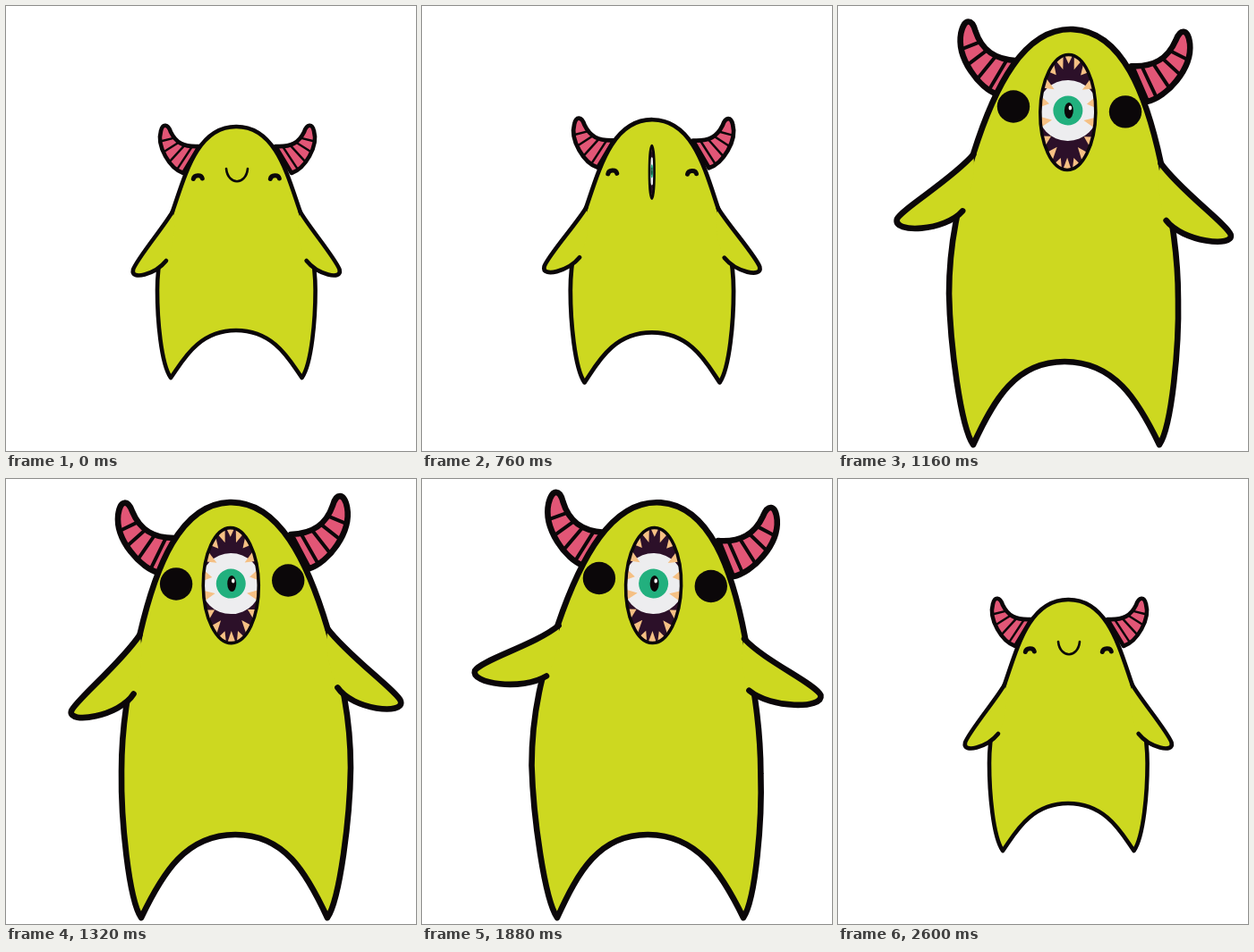
Write an HTML page with a canvas that moves like this. It is 458 px wide and 498 px high and loops after 2.64 s.

```html
<!DOCTYPE html>
<html>
<head>
<meta charset="utf-8">
<style>
html, body { margin: 0; width: 458px; height: 498px; overflow: hidden; background: #fff; }
canvas { display: block; }
</style>
</head>
<body>
<canvas id="stage" width="458" height="498"></canvas>
<script>
const ctx = document.getElementById('stage').getContext('2d');
const LOOP = 2640, INK = '#0b0709', SKIN = '#cdd820', HORN = '#e25676', TOOTH = '#f5c084';

// Left half of each part, as x,y pairs of Bezier points; the right half is mirrored.
const BODY = {
  calm: [257,135, 213,135, 200,190, 186,230, 176,260, 169,285, 169,318,
         169,350, 173,400, 184,416, 196,400, 213,363, 257,363],
  wild: [255,26, 200,26, 170,95, 150,171, 140,215, 127,260, 127,325,
         127,380, 137,470, 151,491, 175,440, 200,398, 255,398]
};
const ARM = {
  calm: [186,230, 178,245, 146,283, 142,295, 139,308, 167,300, 179,285],
  down: [150,171, 128,202, 75,243, 71,254, 66,270, 125,262, 141,237],
  up:   [152,172, 125,187, 60,187, 51,201, 48,215, 105,232, 142,220]
};
const HORNS = {
  calm: [198,187, 183,182, 168,157, 173,140, 175,131, 181,132, 184,141, 190,153, 198,158, 216,157],
  wild: [175,103, 153,97, 126,64, 130,36, 133,18, 142,20, 146,33, 154,54, 169,64, 194,64]
};
const BEATS = [960, 1320, 1640, 2120];

const mix = (a, b, k) => a + (b - a) * k;
const mixAll = (a, b, k) => a.map((v, i) => mix(v, b[i], k));
const smooth = (t, from, to) => {
  const k = Math.min(1, Math.max(0, (t - from) / (to - from)));
  return k * k * (3 - 2 * k);
};

// Half turns done at time t, given the count reached on each beat.
function swing(t, counts) {
  const i = t < BEATS[1] ? 0 : t < BEATS[2] ? 1 : 2;
  const k = (t - BEATS[i]) / (BEATS[i + 1] - BEATS[i]);
  return Math.cos(Math.PI * mix(counts[i], counts[i + 1], k));
}

let tilt = 0;

// The upper body turns around the chest while the feet stay put.
function bend([x, y]) {
  const w = y < 250 ? 1 : Math.max(0, 1 - (y - 250) / 240) ** 2;
  const c = Math.cos(tilt * w), s = Math.sin(tilt * w), dx = x - 256, dy = y - 190;
  return [256 + dx * c - dy * s, 190 + dx * s + dy * c];
}

function points(list, axis) {
  const out = [];
  for (let i = 0; i < list.length; i += 2) {
    out.push([axis === undefined ? list[i] : 2 * axis - list[i], list[i + 1]]);
  }
  return out;
}

function curve(pts) {
  ctx.beginPath();
  ctx.moveTo(...pts[0]);
  for (let i = 1; i < pts.length; i += 3) {
    ctx.bezierCurveTo(...pts[i], ...pts[i + 1], ...pts[i + 2]);
  }
}

function bezierAt(p, t) {
  const u = 1 - t, w = [u * u * u, 3 * u * u * t, 3 * u * t * t, t * t * t];
  return [0, 1].map(d => w.reduce((sum, k, i) => sum + k * p[i][d], 0));
}

function paint(fill, width) {
  ctx.fillStyle = fill;
  ctx.fill();
  ctx.lineWidth = width;
  ctx.stroke();
}

function oval(x, y, rx, ry, fill) {
  ctx.beginPath();
  ctx.ellipse(x, y, rx, ry, 0, 0, 2 * Math.PI);
  ctx.fillStyle = fill;
  ctx.fill();
}

function drawHorn(pts, grow, width) {
  pts = pts.map(bend);
  curve(pts);
  ctx.closePath();
  paint(HORN, width);
  ctx.lineWidth = mix(2.4, 4, grow);
  ctx.beginPath();
  for (let k = 0.21; k < 0.9; k += 0.21) {
    ctx.moveTo(...bezierAt(pts.slice(0, 4), 1 - k));
    ctx.lineTo(...bezierAt(pts.slice(6, 10), k));
  }
  ctx.stroke();
}

function drawArm(pts, side, width) {
  const [top, inner] = [pts[0], pts[6]];
  const bulge = bend([(top[0] + inner[0]) / 2 + 10 * side, (top[1] + inner[1]) / 2]);
  pts = pts.map(bend);
  curve(pts);
  ctx.quadraticCurveTo(...bulge, ...pts[0]);
  ctx.fillStyle = SKIN;
  ctx.fill();
  curve(pts);
  ctx.lineWidth = width;
  ctx.stroke();
}

function drawEye(x, y, grow) {
  [x, y] = bend([x, y]);
  if (grow > 0.1) {
    const r = mix(6, 18.2, grow);
    oval(x, y, r, r, INK);
    return;
  }
  ctx.beginPath();
  ctx.moveTo(x - 5, y + 1.5);
  ctx.bezierCurveTo(x - 4, y - 3.5, x + 4, y - 3.5, x + 5, y + 1);
  ctx.lineWidth = 5;
  ctx.stroke();
}

function drawMouth(grow) {
  if (grow < 0.02) {
    curve([[246, 182], [248, 201], [268, 201], [270, 182]]);
    ctx.lineWidth = 2.6;
    ctx.stroke();
    return;
  }
  const rx = mix(0.6, 31, grow), ry = mix(27, 64.5, grow);
  ctx.save();
  ctx.translate(...bend([mix(257, 253.5, grow), mix(191, 119, grow)]));
  ctx.rotate(tilt * 0.3);
  ctx.save();
  ctx.scale(rx / 31, ry / 64.5);
  oval(0, 0, 31, 64.5, '#2c1029');
  ctx.clip();
  oval(0, -2, 34, 34, '#ededef');
  ctx.fillStyle = TOOTH;
  for (let i = 0; i < 18; i++) {
    const a = (i + 0.5) * Math.PI / 9, size = 1 - 0.25 * (i % 2);
    const x = 31 * Math.cos(a), y = 64.5 * Math.sin(a);
    const nx = -Math.cos(a), ny = -Math.sin(a) * 0.8;
    ctx.beginPath();
    ctx.moveTo(x - 6 * ny, y + 6 * nx);
    ctx.lineTo(x + 13 * nx * size, y + 17 * ny * size);
    ctx.lineTo(x + 6 * ny, y - 6 * nx);
    ctx.fill();
  }
  oval(0, -2, 16.5, 16.5, '#22b07e');
  oval(1, -2, 5, 9, INK);
  oval(2.5, -5, 1.8, 2.5, '#fff');
  ctx.restore();
  ctx.beginPath();
  ctx.ellipse(0, 0, rx, ry, 0, 0, 2 * Math.PI);
  ctx.lineWidth = mix(2.6, 3.6, grow);
  ctx.stroke();
  ctx.restore();
}

function draw(t) {
  const breath = 0.012 * Math.sin(Math.PI * t / 520) ** 2;
  const grow = Math.max(breath, smooth(t, 730, 920) - smooth(t, 2130, 2270));
  const flap = (1 - swing(t, [0, 4, 7, 12])) / 2;
  tilt = grow * (1.15 + 2.95 * swing(t, [0, 3, 6, 10])) * Math.PI / 180;

  const width = mix(4.6, 6.6, grow), axis = mix(257.3, 255, grow);
  const horn = mixAll(HORNS.calm, HORNS.wild, grow);
  const body = mixAll(BODY.calm, BODY.wild, grow);
  const arm = mixAll(ARM.calm, mixAll(ARM.down, ARM.up, flap), grow);

  ctx.fillStyle = '#fff';
  ctx.fillRect(0, 0, 458, 498);
  ctx.strokeStyle = INK;
  ctx.lineCap = ctx.lineJoin = 'round';

  drawHorn(points(horn), grow, width);
  drawHorn(points(horn, mix(258.5, 258, grow)), grow, width);

  const right = points(body, axis).reverse().slice(1);
  curve([...points(body), ...right].map(bend));
  ctx.closePath();
  paint(SKIN, width);

  drawArm(points(arm), 1, width);
  drawArm(points(arm, axis), -1, width);

  const eyeX = mix(43, 62.6, grow), eyeY = mix(192, 115.4, grow);
  drawEye(axis - eyeX, eyeY, grow);
  drawEye(axis + eyeX, eyeY, grow);
  drawMouth(grow);
}

function tick() {
  draw(performance.now() % LOOP);
  requestAnimationFrame(tick);
}
tick();
</script>
</body>
</html>
```
